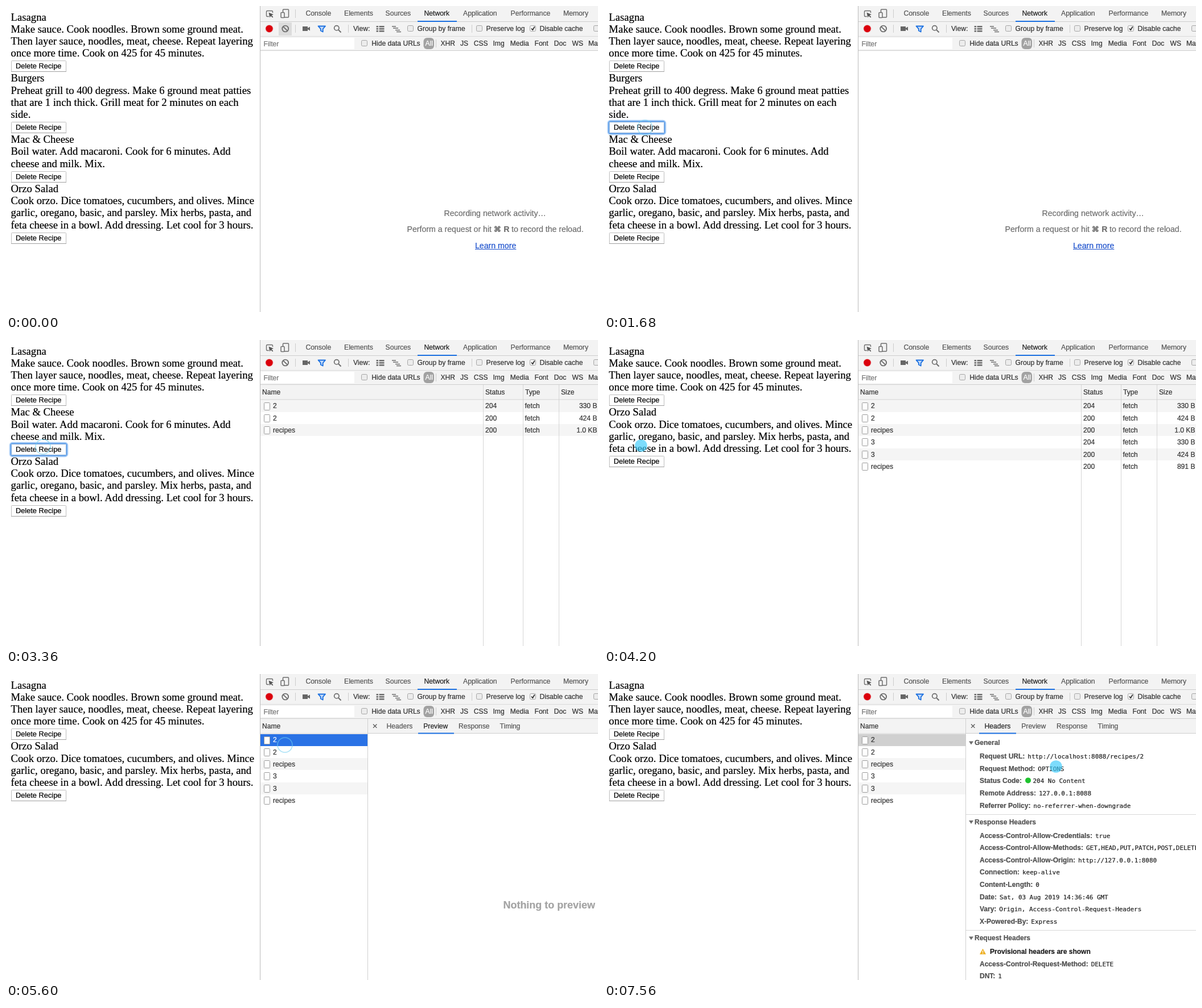
Animation, 1040 px wide and 539 px high, one loop 8000 ms. Source, as an HTML page with a canvas:

```html
<!DOCTYPE html>
<html lang="en">
<head>
<meta charset="utf-8">
<title>Deleting recipes with the network panel open</title>
<style>
html, body { margin: 0; width: 100%; height: 100%; overflow: hidden; background: #fff; }
canvas { display: block; }
</style>
</head>
<body>
<canvas id="stage" width="1040" height="539"></canvas>
<script>
const ctx = document.getElementById('stage').getContext('2d');
const LOOP = 8000, STEP = 140, LAST = 7560;
const SANS = '"Liberation Sans", Arial, sans-serif';
const UI = `12.1px ${SANS}`, BOLD = `bold 12px ${SANS}`;
const MONO = '10.93px "DejaVu Sans Mono", monospace';
const SERIF = '18.66px "Liberation Serif", Times, serif';
const GREY = '#6e6e6e', BLUE = '#1a6fe0';

const recipes = [
  ['Lasagna', 'Make sauce. Cook noodles. Brown some ground meat.',
    'Then layer sauce, noodles, meat, cheese. Repeat layering',
    'once more time. Cook on 425 for 45 minutes.'],
  ['Burgers', 'Preheat grill to 400 degress. Make 6 ground meat patties',
    'that are 1 inch thick. Grill meat for 2 minutes on each', 'side.'],
  ['Mac & Cheese', 'Boil water. Add macaroni. Cook for 6 minutes. Add',
    'cheese and milk. Mix.'],
  ['Orzo Salad', 'Cook orzo. Dice tomatoes, cucumbers, and olives. Mince',
    'garlic, oregano, basic, and parsley. Mix herbs, pasta, and',
    'feta cheese in a bowl. Add dressing. Let cool for 3 hours.'],
];

const requests = [
  ['2', '204', '330 B', 1820], ['2', '200', '424 B', 1820], ['recipes', '200', '1.0 KB', 1960],
  ['3', '204', '330 B', 3500], ['3', '200', '424 B', 3500], ['recipes', '200', '891 B', 3640],
];

// Title, y of the title, then key/value pairs
const sections = [
  ['General', 121, [['Request URL:', 'http://localhost:8088/recipes/2'], ['Request Method:', 'OPTIONS'],
    ['Status Code:', '204 No Content'], ['Remote Address:', '127.0.0.1:8088'],
    ['Referrer Policy:', 'no-referrer-when-downgrade']]],
  ['Response Headers', 260.5, [['Access-Control-Allow-Credentials:', 'true'],
    ['Access-Control-Allow-Methods:', 'GET,HEAD,PUT,PATCH,POST,DELETE'],
    ['Access-Control-Allow-Origin:', 'http://127.0.0.1:8080'], ['Connection:', 'keep-alive'],
    ['Content-Length:', '0'], ['Date:', 'Sat, 03 Aug 2019 14:36:46 GMT'],
    ['Vary:', 'Origin, Access-Control-Request-Headers'], ['X-Powered-By:', 'Express']]],
  ['Request Headers', 465, [['', 'Provisional headers are shown'],
    ['Access-Control-Request-Method:', 'DELETE'], ['DNT:', '1']]],
];

// Pointer travel: start, end, hidden from, x0, y0, x1, y1
const moves = [
  [140, 1120, 1680, 1001, 429, 72, 214],
  [2380, 2940, 3360, 71, 214, 65, 186],
  [4200, 4340, 4480, 65, 186, 65, 186],
  [4480, 5460, 5600, 70, 186, 490, 125],
  [6160, 6580, 6720, 500, 123, 685, 99],
  [7280, 7560, 8000, 695, 127, 794, 163],
];
const clicks = [[1680, 72, 214], [3360, 65, 188], [5600, 490, 125], [6720, 685, 99]];

// A hairline outline gives the text its slightly heavy weight
function text(str, x, y, font = UI, color = '#333', align = 'left') {
  ctx.font = font;
  ctx.fillStyle = ctx.strokeStyle = color;
  ctx.lineWidth = .22;
  ctx.textAlign = align;
  ctx.fillText(str, x, y);
  ctx.strokeText(str, x, y);
  return ctx.measureText(str).width;
}
function rect(x, y, w, h, color) {
  ctx.fillStyle = color;
  ctx.fillRect(x, y, w, h);
}
function box(x, y, w, h, r, fill, stroke, width = 1) {
  ctx.beginPath();
  ctx.roundRect(x, y, w, h, r);
  if (fill) { ctx.fillStyle = fill; ctx.fill(); }
  if (stroke) { ctx.strokeStyle = stroke; ctx.lineWidth = width; ctx.stroke(); }
}
function disc(x, y, r, color) {
  ctx.beginPath();
  ctx.arc(x, y, r, 0, 7);
  ctx.fillStyle = color;
  ctx.fill();
}
function ring(x, y, r, color, width) {
  ctx.beginPath();
  ctx.arc(x, y, r, 0, 7);
  ctx.strokeStyle = color;
  ctx.lineWidth = width;
  ctx.stroke();
}
function path(d, fill, stroke, width = 1.5) {
  const shape = new Path2D(d);
  if (fill) { ctx.fillStyle = fill; ctx.fill(shape); }
  if (stroke) { ctx.strokeStyle = stroke; ctx.lineWidth = width; ctx.stroke(shape); }
}
function checkbox(x, y, checked) {
  box(x + .5, y + .5, 10, 10, 2, checked ? '#f4f4f4' : '#ececec', '#a5a5a5');
  if (checked) path(`M${x + 3} ${y + 5.5}l2.2 2.8l3.6-6`, null, '#333', 1.7);
}

function drawButton(y, focused) {
  if (focused) {
    box(7.5, y - 11.5, 100, 23, 4, null, 'rgba(90,160,240,.4)', 4);
    box(8.3, y - 10.7, 98.4, 21.4, 3, null, '#6ea9ee', 2.5);
  }
  box(9.5, y - 9.5, 96, 19, 1, '#fff', focused ? '#7fa9d8' : '#bdbdbd');
  if (!focused) rect(9, y + 9, 97, 1, '#9f9f9f');
  text('Delete Recipe', 17, y + 4.4, `12.8px ${SANS}`, '#000');
}

function drawRecipes(t) {
  const focus = t >= 1680 && t < 1960 ? 1 : t >= 3360 && t < 3640 ? 2 : -1;
  let y = 25.5;
  recipes.forEach((lines, i) => {
    if (i === 1 && t >= 1960 || i === 2 && t >= 3640) return;
    for (const line of lines) {
      text(line, 8.6, y, SERIF, '#000');
      y += 21.33;
    }
    drawButton(Math.round(y - 4.4), i === focus);
    y += 22.5;
  });
}

function drawToolbars(t) {
  rect(446, 0, 594, 79, '#f3f3f3');
  rect(446, 27, 594, 1, '#cdcdcd');
  rect(446, 53, 594, 1, '#dadada');
  rect(446, 78, 594, 1, '#cdcdcd');

  path('M462 18.5H459Q457.5 18.5 457.5 17V10Q457.5 8.5 459 8.5H467Q468.5 8.5 468.5 10V12', null, GREY, 1.4);
  path('M461.5 11.5L470 15L466.6 16.2L469.4 19.4L468 20.6L465.2 17.4L463.4 20.4Z', '#555');
  box(486.5, 6, 10, 14, 1, null, GREY, 1.5);
  box(483, 11.5, 6, 9, 1, '#f3f3f3', GREY, 1.5);
  rect(508, 6, 1, 15, '#ccc');
  const tabs = [['Console', 526.5], ['Elements', 594], ['Sources', 666.5], ['Network', 734.5],
    ['Application', 803], ['Performance', 886.5], ['Memory', 979]];
  for (const [name, x] of tabs) text(name, x, 17.3, `12.2px ${SANS}`, name === 'Network' ? '#222' : '#555');
  rect(723, 26, 69, 2, BLUE);

  if (t < 1680) rect(479, 29, 23, 23, '#dcdcdc');
  disc(462.5, 40, 7.2, 'rgba(220,0,10,.18)');
  disc(462.5, 40, 6.2, '#db000c');
  ring(490.7, 40, 5.4, GREY, 1.9);
  path('M487 36.3L494.4 43.7', null, GREY, 1.9);
  for (const x of [508, 601, 818]) rect(x, 33, 1, 14, '#ccc');
  path('M521 36H530V39L534 36.5V43.5L530 41V44H521Z', '#666');
  path('M548.5 35.5H561L556.7 40.3V45.5L552.8 43.5V40.3Z', '#c9ddf8', BLUE, 1.8);
  ring(580.8, 38.8, 4.2, GREY, 1.7);
  path('M584 42L588.5 46.5', null, GREY, 2);
  text('View:', 610, 44.3);
  for (const y of [35, 39, 43]) {
    rect(650.5, y, 3.5, 2.6, GREY);
    rect(655.5, y, 9, 2.6, GREY);
  }
  path('M678 36H685M680 39H689M684 42.5H692M686 45.5H694', null, GREY, 1.7);
  for (const [x, label, checked] of [[705, 'Group by frame'], [826, 'Preserve log'],
    [920, 'Disable cache', true], [1032, '']]) {
    checkbox(x, 34, checked);
    text(label, x + 17.6, 44.3);
  }

  rect(447, 56, 165, 20, '#fff');
  text('Filter', 452.5, 71, UI, '#757575');
  checkbox(624, 60);
  text('Hide data URLs', 642.3, 70.3);
  box(733.5, 56, 18.5, 20, 6, '#a2a2a2');
  text('All', 736.5, 70.3, UI, '#fff');
  rect(755, 59, 1, 14, '#ccc');
  const types = [['XHR', 763.5], ['JS', 798], ['CSS', 821.7], ['Img', 855.5], ['Media', 885.7],
    ['Font', 928.5], ['Doc', 962.7], ['WS', 994.5], ['Manifest', 1023]];
  for (const [name, x] of types) text(name, x, 70.3);
}

function drawEmptyPanel() {
  const font = `14.15px ${SANS}`;
  text('Recording network activity…', 769.5, 370.3, font, GREY);
  text('Perform a request or hit', 704.5, 398.3, font, GREY);
  text('⌘', 856.5, 398.3, `bold 13px ${SANS}`, GREY);
  text('R', 874.3, 398.3, `bold 14.1px ${SANS}`, GREY);
  text('to record the reload.', 888, 398.3, font, GREY);
  const width = text('Learn more', 824, 426.8, font, '#1a4fcc');
  rect(824, 428, width, 1, '#1a4fcc');
}

function drawRequests(t, detail) {
  const right = detail ? 635 : 1040;
  rect(446, 79, right - 446, 26, '#f3f3f3');
  text('Name', 450, 95.6);
  requests.forEach(([name, status, size, since], i) => {
    if (t < since) return;
    const y = 105.5 + i * 21.3, selected = detail && i === 0;
    const back = selected ? (t < 6720 ? '#2a72e5' : '#d0d0d0') : i % 2 ? '#fff' : '#f5f5f5';
    const color = selected && t < 6720 ? '#fff' : '#333';
    rect(447, Math.round(y), right - 447, 21, back);
    box(453.5, Math.round(y) + 4.5, 10, 13, 1, '#fff', '#9a9a9a');
    text(name, 469, y + 14.9, UI, color);
    if (detail) return;
    text(status, 842, y + 14.9);
    text('fetch', 911.5, y + 14.9);
    text(size, 1038.5, y + 14.9, UI, '#333', 'right');
  });
  if (!detail) {
    for (const [x, name] of [[838, 'Status'], [908, 'Type'], [971, 'Size']]) {
      rect(x, 79, 1, 460, '#d6d6d6');
      text(name, x + 4, 95.6);
    }
  }
  rect(446, 104.5, right - 446, 1, '#cfcfcf');
}

function drawHeaders() {
  for (const [title, y, rows] of sections) {
    if (y > 200) rect(636, Math.round(y - 14), 404, 1, '#d8d8d8');
    path(`M641 ${y - 2.5}h8l-4 6z`, GREY);
    text(title, 651, y + 4.4, BOLD, '#555');
    rows.forEach(([key, value], i) => {
      const base = y + 28.3 + i * 21.55;
      if (!key) {
        path(`M665.5 ${base - 9.5}l5.5 10h-11z`, '#eeb024');
        path(`M665.5 ${base - 6}v3.4m0 1v1.4`, null, '#fff', 1.2);
        text(value, 678, base, BOLD, '#222');
        return;
      }
      let x = 665 + text(key, 660, base, BOLD, '#505050');
      if (key.startsWith('Status')) {
        disc(745, base - 5, 5, '#1fc32f');
        x = 753.5;
      }
      text(value, x, base, MONO, '#222');
    });
  }
}

function drawDetail(t) {
  rect(635, 79, 405, 460, '#fff');
  rect(636, 79, 404, 26, '#f3f3f3');
  rect(636, 104, 404, 1, '#cfcfcf');
  rect(635, 79, 1, 460, '#cfcfcf');
  path('M645 88.5l6.4 6.4m0-6.4l-6.4 6.4', null, '#555', 1.3);
  const headers = t >= 6720, active = headers ? 'Headers' : 'Preview';
  for (const [name, x] of [['Headers', 668.5], ['Preview', 733.3], ['Response', 795], ['Timing', 867.5]])
    text(name, x, 95.6, UI, name === active ? '#222' : '#555');
  const slide = Math.min(1, Math.max(0, (t - 6720 + 65) / 205));
  rect(724 - 65 * slide, 103.5, 63 + 2 * slide, 2, BLUE);
  if (headers) drawHeaders();
  else text('Nothing to preview', 873.5, 412.7, `bold 17.95px ${SANS}`, '#a4a4a4');
}

function drawPointer(t) {
  for (const [start, end, hide, x0, y0, x1, y1] of moves) {
    if (t < start || t >= hide) continue;
    const left = 1 - Math.min(1, (t - start) / (end - start)), k = 1 - left ** 1.6;
    disc(x0 + (x1 - x0) * k, y0 + (y1 - y0) * k, 10.8, 'rgba(64,204,250,.68)');
  }
  for (const [start, x, y] of clicks) {
    const age = (t - start) / 420;
    if (age >= 0 && age < 1) ring(x, y, 13 + 4 * age, `rgba(110,205,240,${.6 * (1 - age)})`, 1.6);
  }
}

function draw(t) {
  rect(0, 0, 1040, 539, '#fff');
  drawRecipes(t);
  drawToolbars(t);
  const detail = t >= 5600;
  if (t < 1820) drawEmptyPanel();
  else drawRequests(t, detail);
  if (detail) drawDetail(t);
  rect(446, 0, 1, 539, '#bcbcbc');
  drawPointer(t);
}

ctx.fontKerning = 'normal';
ctx.lineJoin = 'round';
function tick(now) {
  draw(Math.min(LAST, Math.floor(now % LOOP / STEP) * STEP));
  requestAnimationFrame(tick);
}
requestAnimationFrame(tick);
</script>
</body>
</html>
```
